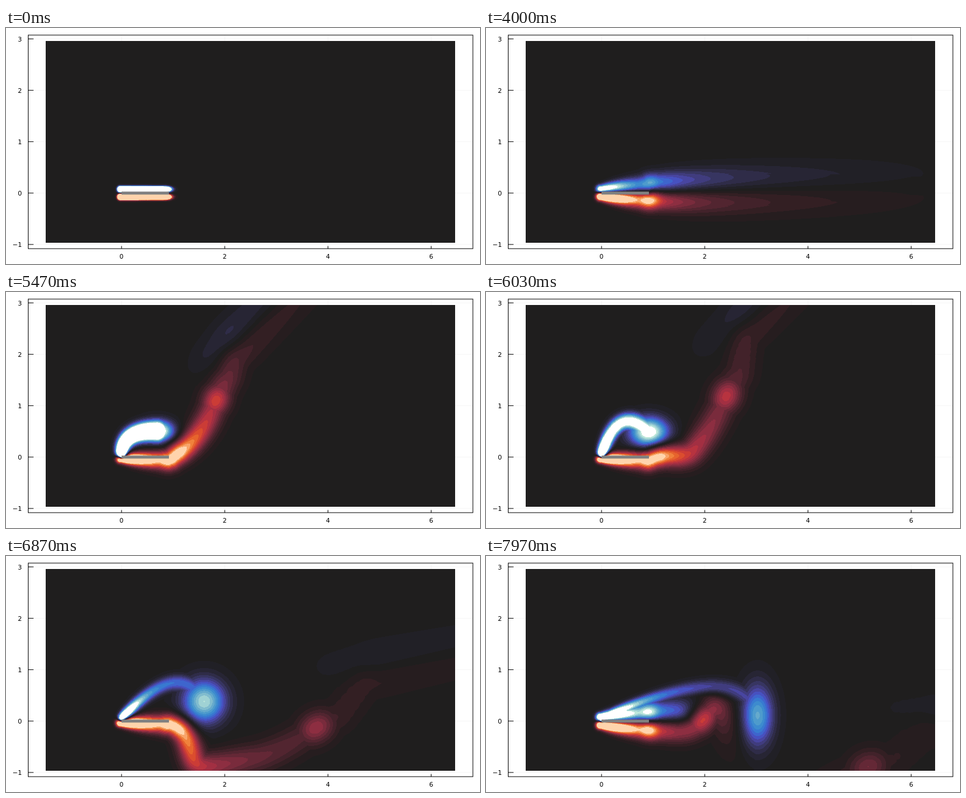
An HTML page with a canvas that plays this animation: 800x400 px, repeating every 8 s.

```html
<!DOCTYPE html>
<html lang="en">
<head>
<meta charset="utf-8">
<title>Vorticity around a pitching plate</title>
<style>
  html, body { margin: 0; width: 100%; height: 100%; overflow: hidden; background: #fff; }
  svg, canvas { position: absolute; left: 0; top: 0; }
  canvas { left: 67px; top: 22px; }
  text { font: 10.67px "DejaVu Sans", sans-serif; fill: #000; }
  .grid { stroke: #000; stroke-opacity: .06; stroke-width: .7; }
  .axis { stroke: #000; stroke-width: 1; fill: none; }
</style>
</head>
<body>
<svg id="axes" width="800" height="400"></svg>
<canvas id="field" width="691" height="342"></canvas>
<svg width="800" height="400"><rect x="195" y="277.3" width="80" height="5" fill="#808080"/></svg>
<script>
const LOOP = 8000, FPS = 30, LEVELS = 15;
const UNIT = 87.1, LEFT = 67, TOP = 22, W = 691, H = 342;
const ORIGIN = { x: 195, y: 279.8 };
const PLATE = 80, SPEED = 118;   // px, px per second

// ---- axes ----
const toX = v => ORIGIN.x + UNIT * v, toY = v => ORIGIN.y - UNIT * v;
const line = (cls, x1, y1, x2, y2) =>
  `<line class="${cls}" x1="${x1}" y1="${y1}" x2="${x2}" y2="${y2}"/>`;
const label = (anchor, x, y, v) =>
  `<text text-anchor="${anchor}" x="${x}" y="${y}">${String(v).replace('-', '\u2212')}</text>`;
let marks = '';
for (const v of [0, 2, 4, 6]) {
  const x = toX(v);
  marks += line('grid', x, 12, x, 374) + line('axis', x, 374, x, 369.5) + label('middle', x, 390.5, v);
}
for (const v of [-1, 0, 1, 2, 3]) {
  const y = toY(v);
  marks += line('grid', 38, y, 788, y) + line('axis', 38, y, 46.5, y) + label('end', 26.7, y + 4, v);
}
marks += '<rect class="axis" x="37.5" y="12" width="750.5" height="362"/>';
document.getElementById('axes').innerHTML = marks;

// ---- colour bands, from still fluid outwards ----
const palette = text => text.split(' ').map(hex => {
  const n = parseInt(hex, 16);
  return 0xff000000 | (n & 255) << 16 | (n & 0xff00) | n >> 16;
});
const COOL = palette('1f1e1e 212026 272534 2f2c48 373561 403c7e 4845a0 4751c0 3e65cd 387ad0 3d8bce 4e9bcc 66aacc 81bcce a0d2d4 bde7db ffffff');
const WARM = palette('1f1e1e 261d1f 331f23 42222a 522530 642836 792b3c 8d2e41 a22f42 b7333f cb3c36 db4d2e e6642d f0823c f8a569 ffd4ac');

// ---- helpers ----
const clamp = u => Math.min(1, Math.max(0, u));
const smooth = (t, a, b) => { const u = clamp((t - a) / (b - a)); return u * u * (3 - 2 * u); };
const bell = (x, mid, width) => Math.exp(-(((x - mid) / width) ** 2));
const approach = (t, scale) => 1 - Math.exp(-t / scale);

// ---- motion ----
// The plate pitches up by 45 degrees, holds, and returns; the view turns with it.
const pitch = t => Math.PI / 4 * (smooth(t, 3.85, 5.3) - smooth(t, 5.8, 7.4));
const separated = t => smooth(t, 3.7, 4.6) - smooth(t, 7, 7.6);

// Core of the vortex shed by the leading edge, in plate coordinates.
function leadingVortex(t) {
  const u = t - 5.47, grown = smooth(t, 4, 5.2);
  return {
    u, grown,
    x: (60 + 25.6 * u + 22.4 * u * u) * grown,
    y: (44 - 5.5 * u * u) * grown,
    wx: 27 + 10 * Math.sin(1.25 * u),
    wy: Math.max(12, 18 + 14 * u),
    a: 1.4 / (1 + .32 * u) * grown
  };
}

// Distance s runs along the plate and on into the wake, which is carried by the stream.
function shear(s, t, core) {
  const age = Math.max(0, s - PLATE) / SPEED, born = t - age, apart = separated(born);
  const grown = 1 - .88 * Math.exp(-Math.max(0, s) / 120);
  const width = 4.2 + 24 * approach(t, 1.1) * grown;
  const offset = 6.5 + 19 * approach(t, 2) * (grown - .12);
  const front = 1 / (1 + Math.exp((s - 80 - 80 * t - 8 * t * t) / (3 + 15 * t)));
  const base = (2 / (1 + (Math.max(0, s) / 62) ** 1.5) + .35 * bell(s, PLATE, 12) + 3 * Math.exp(-t / .2)) * front;

  const roll = Math.max(bell(born, 4.5, .15), bell(born, 7.2, .15)) * .87 * Math.exp(-.24 * age);
  const swept = Math.exp(-(((born - 5.8) / .95) ** 4)) * smooth(t, 6.9, 7.9) * smooth(age, 0, .5);
  const warm = Math.max(base * (1 + .7 * apart * smooth(age, 0, .2)), roll) * (1 - swept);
  const cool = base * (1 - apart);
  const warmOffset = offset * (1 - .6 * apart);
  if (s <= PLATE) return { width, warm, cool, warmAt: [s, -warmOffset], coolAt: [s, offset] };

  const tilt = pitch(born), turn = pitch(t), c = Math.cos(turn), n = Math.sin(turn);
  const drift = smooth(t, 5, 6.4) * smooth(age, 0, .8) * smooth(born, 4, 4.6 - .4) * (1 - smooth(born, 6.2, 7.2));
  const x = PLATE * Math.cos(tilt) + SPEED * age - 35 * drift;
  const lift = 50 * bell(x, core.x - 62, 30) * smooth(t, 7, 7.9);
  const toPlate = y => [c * x - n * y, n * x + c * y];
  return {
    width, warm, cool,
    warmAt: toPlate(lift - PLATE * Math.sin(tilt) - 42 * drift - warmOffset),
    coolAt: toPlate(lift * .6 + offset)
  };
}

// ---- drawing ----
const ctx = document.getElementById('field').getContext('2d');
const picture = ctx.createImageData(W, H);
const pixels = new Uint32Array(picture.data.buffer);
const coolField = new Float32Array(W * H), warmField = new Float32Array(W * H);
const column = new Float32Array(W);

// Keeps the strongest of all overlapping Gaussians.
function stamp(field, [px, py], a, wx, wy = wx) {
  if (a <= .01) return;
  const x = ORIGIN.x + px - LEFT - .5, y = ORIGIN.y - py - TOP - .5;
  const reach = Math.sqrt(Math.log(a / .008));
  const x0 = Math.max(0, Math.ceil(x - reach * wx)), x1 = Math.min(W - 1, Math.floor(x + reach * wx));
  const y0 = Math.max(0, Math.ceil(y - reach * wy)), y1 = Math.min(H - 1, Math.floor(y + reach * wy));
  for (let i = x0; i <= x1; i++) column[i] = bell(i, x, wx);
  for (let j = y0; j <= y1; j++) {
    const row = a * bell(j, y, wy);
    for (let i = x0, n = j * W + x0; i <= x1; i++, n++) {
      const v = row * column[i];
      if (v > field[n]) field[n] = v;
    }
  }
}

function drawShear(t, core) {
  const count = 260;
  for (let i = 0; i <= count; i++) {
    const p = shear(-2 + 760 * (i / count) ** 1.6, t, core);
    stamp(coolField, p.coolAt, p.cool, p.width);
    stamp(warmField, p.warmAt, p.warm, p.width);
  }
}

// A curved sheet feeds the vortex from the leading edge.
function drawLeadingVortex(core) {
  if (!core.grown) return;
  stamp(coolField, [core.x, core.y], core.a, core.wx, core.wy);
  const bendX = (core.x - 58 + 10 * core.u) * core.grown;
  const bendY = (42 + 63 * smooth(core.u, 0, .8)) * core.grown;
  const feed = .3 + 2 / (1 + (1.9 * core.u) ** 2);
  const count = 120;
  for (let i = 0; i <= count; i++) {
    const q = i / count, mid = 2 * q * (1 - q), end = q * q;
    const a = (1.8 * Math.exp(-q / .12) + feed) * core.grown;
    stamp(coolField, [mid * bendX + end * core.x, 4 + mid * bendY + end * (core.y - 4)], a, 6 + 10 * Math.sqrt(q));
  }
}

function draw(t) {
  const core = leadingVortex(t);
  coolField.fill(0);
  warmField.fill(0);
  drawShear(t, core);
  drawLeadingVortex(core);
  for (let n = 0; n < pixels.length; n++) {
    const v = coolField[n] - warmField[n];
    pixels[n] = v >= 0
      ? COOL[Math.min(LEVELS + 1, Math.round(v * LEVELS))]
      : WARM[Math.min(LEVELS, Math.round(-v * LEVELS))];
  }
  ctx.putImageData(picture, 0, 0);
}

let start, shown = -1;
function tick(now) {
  start ??= now;
  const step = Math.floor((now - start) % LOOP * FPS / 1000 + .01);
  if (step !== shown) draw((shown = step) / FPS);
  requestAnimationFrame(tick);
}
draw(0);
requestAnimationFrame(tick);
</script>
</body>
</html>
```
